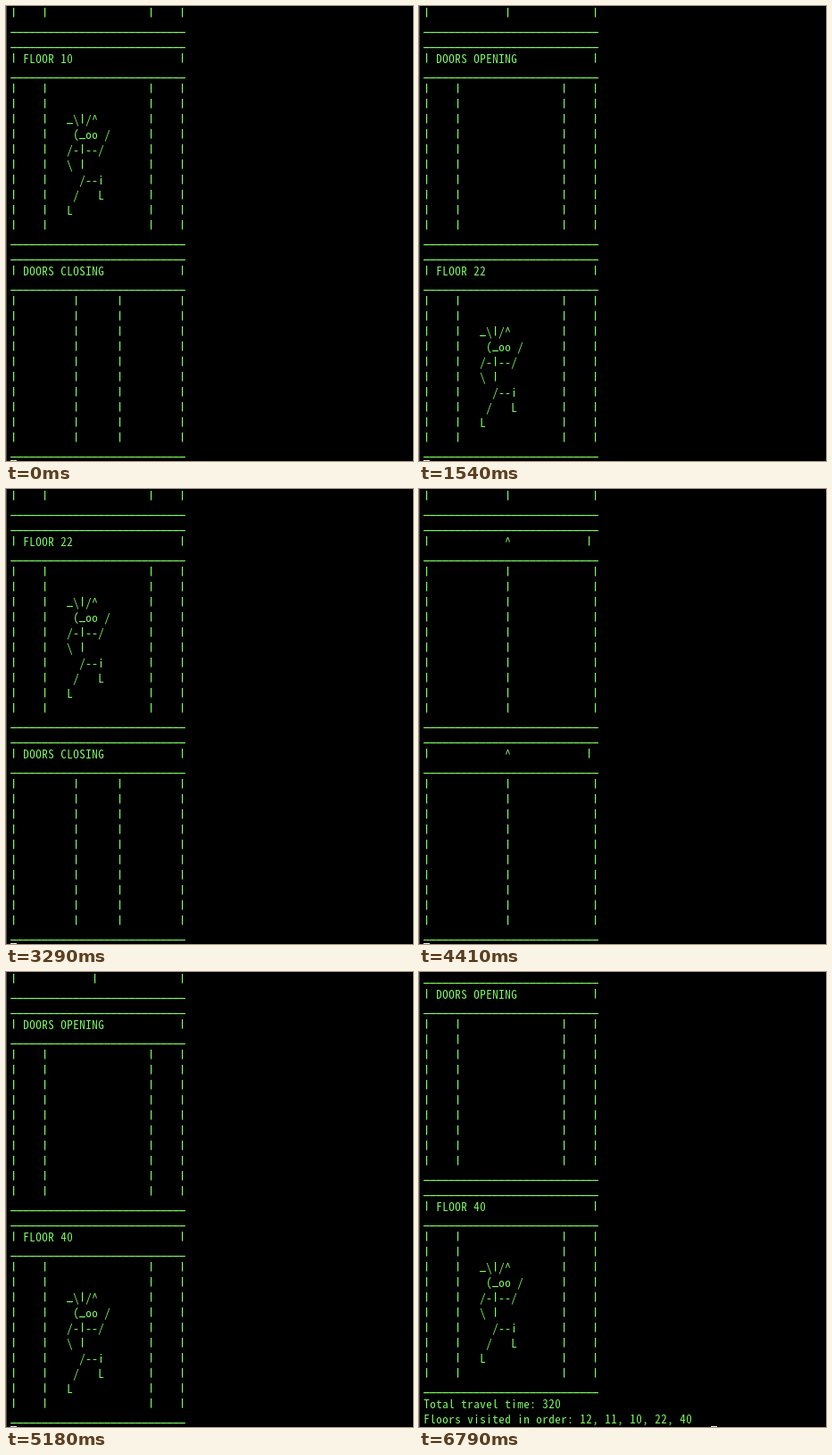
These frames come from a looping animation (456x510 px, 7.84 s). An HTML page with a canvas:

```html
<!DOCTYPE html>
<html lang="en">
<head>
<meta charset="utf-8">
<title>Elevator</title>
<style>
html, body { margin: 0; width: 100%; height: 100%; overflow: hidden; background: #000; }
canvas { display: block; }
</style>
</head>
<body>
<canvas id="screen" width="456" height="510"></canvas>
<script>
const ctx = document.getElementById('screen').getContext('2d');
const LOOP = 7840, COL = 7, ROW = 17, LEFT = 5;
const GREEN = '#7dfb62';
const RULE = '_'.repeat(28);
const RIDER = ['', '', '_\\|/^', ' (_oo /', '/-|--/', '\\ |', '  /--i', ' /   L', 'L', ''];

// Door positions in columns
const OPEN = [5, 22], HALF = [10, 17], SHUT = [13];

function put(line, col, text) {
  return line.slice(0, col).padEnd(col) + text + line.slice(col + text.length);
}

function shaft(doors, rider = '') {
  let line = put(put(' '.repeat(28), 0, '|'), 27, '|');
  for (const col of doors) line = put(line, col, '|');
  return put(line, 9, rider + line.slice(9 + rider.length));
}

function car(sign, doors, hasRider) {
  const body = RIDER.map(part => shaft(doors, hasRider ? part : ''));
  return [RULE, sign, RULE, ...body, RULE];
}

const label = text => '| ' + text.padEnd(25) + '|';
const floor = n => car(label('FLOOR ' + n), OPEN, true);
const opening = car(label('DOORS OPENING'), OPEN);
const closing = car(label('DOORS CLOSING'), HALF);
const moving = car('|' + ' '.repeat(12) + '^' + ' '.repeat(12) + '|', SHUT);

const view = (doors, top, bottom) => [shaft(doors), RULE, ...top, ...bottom];
const leave = n => view(OPEN, floor(n), closing);
const travel = view(SHUT, moving, moving);
const arrive = view(SHUT, moving, opening);
const stop = n => view(SHUT, opening, floor(n));
const summary = [...opening, ...floor(40),
  'Total travel time: 320',
  'Floors visited in order: 12, 11, 10, 22, 40'];

// Start time, lines, cursor column
const scenes = [
  [0, leave(10), 0],
  [840, travel, 0],
  [1050, arrive, 0],
  [1540, stop(22), 0],
  [3290, leave(22), 0],
  [4410, travel, 0],
  [4620, arrive, 0],
  [5180, stop(40), 0],
  [6720, summary, 0],
  [6790, summary, 46]
];

function drawChar(ch, x, y) {
  if (ch === '|') ctx.fillRect(x + 3, y + 2, 1.2, 10.6);
  else if (ch === '_') ctx.fillRect(x + 0.1, y + 12, 6.8, 1.2);
  else if (ch !== ' ') ctx.fillText(ch, x + COL / 2, y + 12.5);
}

function draw(time) {
  const [, lines, cursor] = scenes.findLast(scene => scene[0] <= time);
  ctx.fillStyle = '#000';
  ctx.fillRect(0, 0, 456, 510);
  ctx.fillStyle = '#4a4a4a';
  ctx.fillRect(0, 0, 1, 510);
  ctx.font = '13px "Noto Sans Mono CJK JP", "Noto Sans Mono", monospace';
  ctx.textAlign = 'center';
  ctx.fillStyle = GREEN;
  lines.forEach((line, row) => {
    [...line].forEach((ch, col) => drawChar(ch, LEFT + col * COL, row * ROW));
  });
  ctx.fillStyle = '#e8f5e4';
  ctx.fillRect(LEFT + cursor * COL, 509, COL, 1);
}

const start = performance.now();
function tick() {
  draw((performance.now() - start) % LOOP);
  requestAnimationFrame(tick);
}
tick();
</script>
</body>
</html>
```
